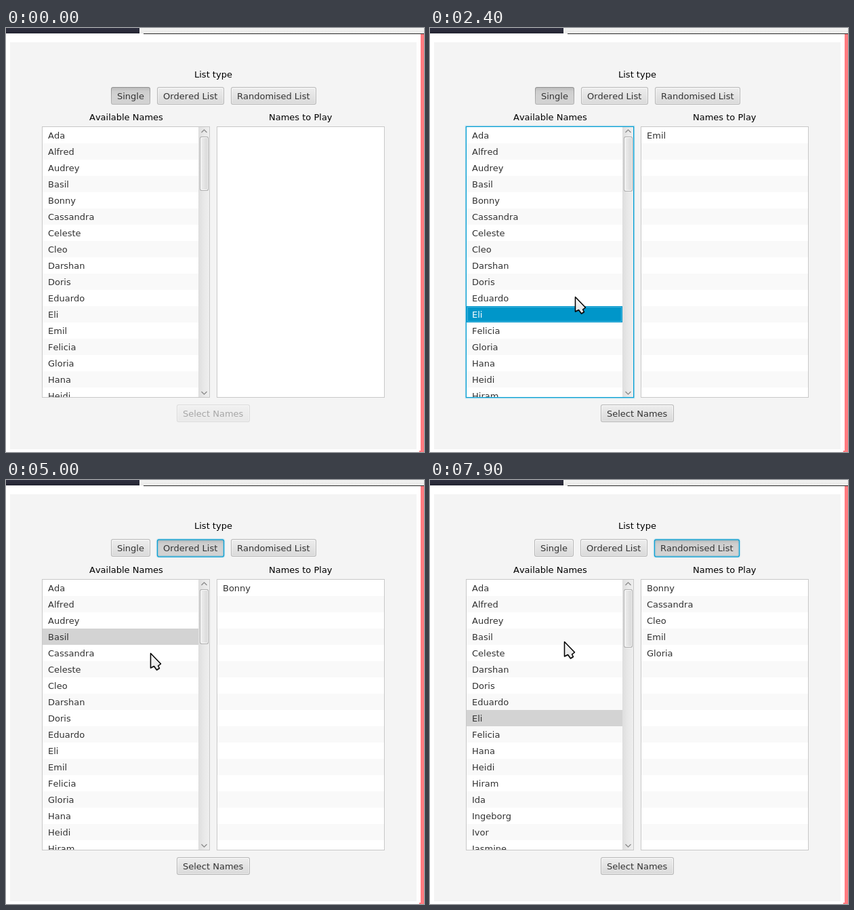
An HTML page with a canvas that plays this animation: 617x625 px, repeating every 8 s.

```html
<!DOCTYPE html>
<html lang="en">
<head>
<meta charset="utf-8">
<title>Name list selection</title>
<style>
html, body { margin: 0; height: 100%; overflow: hidden; background: #fff; }
canvas { display: block; }
</style>
</head>
<body>
<canvas id="stage" width="617" height="625"></canvas>
<script>
const ctx = document.getElementById('stage').getContext('2d');
const LOOP = 8000, STEP = 100, ROW = 24, TOTAL = 68;
const LIST_TOP = 145, BUTTON_TOP = 87, BUTTON_H = 26;
const FOCUS = '#039ed3', GLOW = 'rgba(3,158,211,.14)';

const names = ('Ada Alfred Audrey Basil Bonny Cassandra Celeste Cleo Darshan Doris Eduardo ' +
  'Eli Emil Felicia Gloria Hana Heidi Hiram Ida Ingeborg Ivor Jasmine').split(' ');

const buttons = [
  { label: 'Single', x: 155, w: 58 },
  { label: 'Ordered List', x: 223, w: 99 },
  { label: 'Randomised List', x: 332, w: 126 }
];

// Pointer stops: arrival time, x, y, wait before clicking (0: no click), travel time.
// What a click hits follows from the pointer position.
const ENTRY = [60, -30];
const stops = [
  [500, 168, 214, 200, 400],
  [1100, 183, 302, 200],
  [1700, 229, 191, 100],
  [2100, 214, 421, 100],
  [2400, 214, 396, 0, 100],
  [2900, 204, 232, 100],
  [3300, 206, 432, 100],
  [3600, 205, 402, 0, 100],
  [3800, 195, 264, 100],
  [4400, 240, 104, 200, 400],
  [5000, 213, 255, 200, 300],
  [5500, 195, 445, 200],
  [6100, 178, 280, 100],
  [6500, 168, 376, 100],
  [7500, 404, 102, 100, 800],
  [7900, 198, 238, 0, 300]
];

const remaining = chosen => names.map((_, i) => i).filter(i => !chosen.includes(i));

// Replays every click up to time t
function stateAt(t) {
  const s = { chosen: [], selected: -1, focus: '', mode: 0, armed: -1, button: -1 };
  for (const [arrive, x, y, wait] of stops) {
    const press = arrive + wait;
    if (!wait || t < press) continue;
    const released = t >= press + 100;
    if (y < LIST_TOP) {
      s.focus = 'button';
      s.button = buttons.findIndex(b => x < b.x + b.w);
      if (released) s.mode = s.button;
      else s.armed = s.button;
      continue;
    }
    s.focus = 'list';
    s.selected = remaining(s.chosen)[Math.floor((y - LIST_TOP - 1) / ROW)];
    if (!released) continue;
    s.chosen = s.mode ? [...s.chosen, s.selected] : [s.selected];
    while (s.chosen.includes(s.selected)) s.selected--;
  }
  s.chosen.sort((a, b) => a - b);
  return s;
}

function pointerAt(t) {
  let [x, y] = ENTRY;
  for (const [arrive, toX, toY, , travel = 200] of stops) {
    const k = Math.min(1, Math.max(0, 1 - (arrive - t) / travel));
    const ease = k * k * (3 - 2 * k);
    x += (toX - x) * ease;
    y += (toY - y) * ease;
  }
  return [Math.round(x), Math.round(y)];
}

function rect(x, y, w, h, fill) {
  ctx.fillStyle = fill;
  ctx.fillRect(x, y, w, h);
}

// Rounded box drawn d pixels inside the given bounds
function box(x, y, w, h, d, radius, fill) {
  ctx.fillStyle = fill;
  ctx.beginPath();
  ctx.roundRect(x + d, y + d, w - 2 * d, h - 2 * d, radius);
  ctx.fill();
}

function fade(x0, y0, x1, y1, ...colors) {
  const g = ctx.createLinearGradient(x0, y0, x1, y1);
  colors.forEach((c, i) => g.addColorStop(i / (colors.length - 1), c));
  return g;
}

function text(str, x, y, color = '#000') {
  ctx.fillStyle = color;
  ctx.fillText(str, x, y);
}

function drawButton(label, x, top, w, { on, armed, focused, disabled } = {}) {
  const y = focused ? top + .5 : top, h = BUTTON_H;
  const down = (...colors) => fade(0, y, 0, y + h, ...colors);
  const dark = down('#b8b8b8', '#cecece', '#d2d2d2', '#d2d2d2', '#d2d2d2');
  if (focused) {
    box(x, y, w, h, -1.4, 4, GLOW);
    box(x, y, w, h, -.2, 3, FOCUS);
  } else {
    box(x, y, w, h, 0, 3, on ? down('#919191', '#b6b6b6') : '#b6b6b6');
  }
  if (on) {
    box(x, y, w, h, 1, 2, dark);
    if (focused) {
      box(x, y, w, h, 1, 2, GLOW);
      box(x, y, w, h, 2.6, 1, dark);
    }
  } else {
    box(x, y, w, h, 1, 2, down('#fcfcfc', '#e6e6e6'));
    box(x, y, w, h, 2, 1, armed ? down('#e0e0e0', '#cccccc') : down('#eeeeee', '#d9d9d9'));
  }
  text(label, x + 9, top + 18, '#333');
  if (disabled) rect(x, y, w, h, 'rgba(244,244,244,.6)');
}

function chevron(y, dir) {
  ctx.strokeStyle = '#868686';
  ctx.lineWidth = 1.2;
  ctx.beginPath();
  ctx.moveTo(288.5, y + 2 * dir);
  ctx.lineTo(292.5, y - 2 * dir);
  ctx.lineTo(296.5, y + 2 * dir);
  ctx.stroke();
}

function drawScrollbar(top, removed) {
  rect(284, top + 1, 16, 398, fade(284, 0, 300, 0, '#dedede', '#e8e8e8', '#efefef'));
  chevron(top + 7, 1);
  chevron(top + 393, -1);
  const h = Math.round(80 * TOTAL / (TOTAL - removed)), y = top + 15;
  box(286, y, 13, h, 0, 2.5, '#aeaeae');
  box(286, y, 13, h, 1, 2, '#fafafa');
  box(286, y, 13, h, 2, 1, fade(288, 0, 297, 0, '#eeeeee', '#d9d9d9'));
}

function drawList(x, top, width, items, selected, focused) {
  if (focused) {
    box(x, top, 248, 400, -1.4, 0, GLOW);
    box(x, top, 248, 400, -.3, 0, FOCUS);
  } else {
    rect(x, top, 248, 400, '#c8c8c8');
  }
  rect(x + 1, top + 1, 246, 398, '#fff');
  ctx.save();
  ctx.beginPath();
  ctx.rect(x + 1, top + 1, 246, 398);
  ctx.clip();
  for (let i = 0; items.length && i < 17; i++) {
    const y = top + 1 + i * ROW, hit = items[i] === selected, lit = hit && focused;
    if (i % 2) rect(x + 1, y, width, ROW, '#f9f9f9');
    if (hit) rect(x + 1, y, width, ROW, focused ? '#0096c9' : '#d3d3d3');
    if (lit) {
      ctx.strokeStyle = '#42b5df';
      ctx.lineWidth = 1;
      ctx.strokeRect(x + 2.5, y + 1.5, width - 3, ROW - 3);
    }
    if (i < items.length) text(names[items[i]], x + 9, y + 17, lit ? '#fff' : '#323232');
  }
  ctx.restore();
}

function drawPointer([x, y]) {
  const shape = [[0, 0], [0, 21.5], [5, 19], [9, 24.5], [13, 22], [11, 18.5], [15, 15.5]];
  ctx.save();
  ctx.translate(x + .5, y + .5);
  ctx.beginPath();
  shape.forEach(p => ctx.lineTo(...p));
  ctx.closePath();
  ctx.lineJoin = 'round';
  ctx.lineWidth = 1.5;
  ctx.strokeStyle = '#000';
  ctx.shadowColor = 'rgba(0,0,0,.3)';
  ctx.shadowBlur = 2;
  ctx.shadowOffsetY = 1;
  ctx.fillStyle = fade(0, 0, 8, 24, '#fafafa', '#e2e2e2');
  ctx.fill();
  ctx.shadowColor = 'transparent';
  ctx.stroke();
  ctx.restore();
}

function drawBackdrop() {
  rect(0, 0, 617, 625, '#fff');
  rect(0, 0, 197, 8, fade(0, 0, 0, 8, '#2f3040', '#252633'));
  rect(197, 0, 420, 8, fade(0, 0, 0, 8, '#f3f3f2', '#e9e9e8'));
  rect(203, 8, 414, 1, '#2b2b2b');
  rect(6, 21, 600, 600, '#f4f4f4');
  rect(612, 9, 5, 616, '#ff7b80');
  rect(610, 623, 2, 2, '#ff7b80');
}

function draw(t) {
  const s = stateAt(t), onButton = s.focus === 'button';
  const shift = onButton ? 1 : 0, top = LIST_TOP + shift;
  const slide = onButton && s.button === 2 ? -1 : 0;

  ctx.font = '13px "DejaVu Sans", sans-serif';
  ctx.fontKerning = 'none';
  drawBackdrop();
  text('List type', 278, 73 - shift);
  buttons.forEach((b, i) => drawButton(b.label, b.x + slide, BUTTON_TOP, b.w, {
    on: s.mode === i, armed: s.armed === i, focused: onButton && s.button === i
  }));
  text('Available Names', 123, 136 + shift);
  text('Names to Play', 388, 136 + shift);
  drawList(53, top, 230, remaining(s.chosen), s.selected, s.focus === 'list');
  drawScrollbar(top, s.chosen.length);
  drawList(311, top, 246, s.chosen, -1, false);
  drawButton('Select Names', 252, 555 + shift, 108, { disabled: !s.chosen.length });
  drawPointer(pointerAt(t));
}

const start = performance.now();
function tick() {
  const t = (performance.now() - start) % LOOP;
  draw(Math.floor(t / STEP) * STEP);
  requestAnimationFrame(tick);
}
tick();
</script>
</body>
</html>
```
